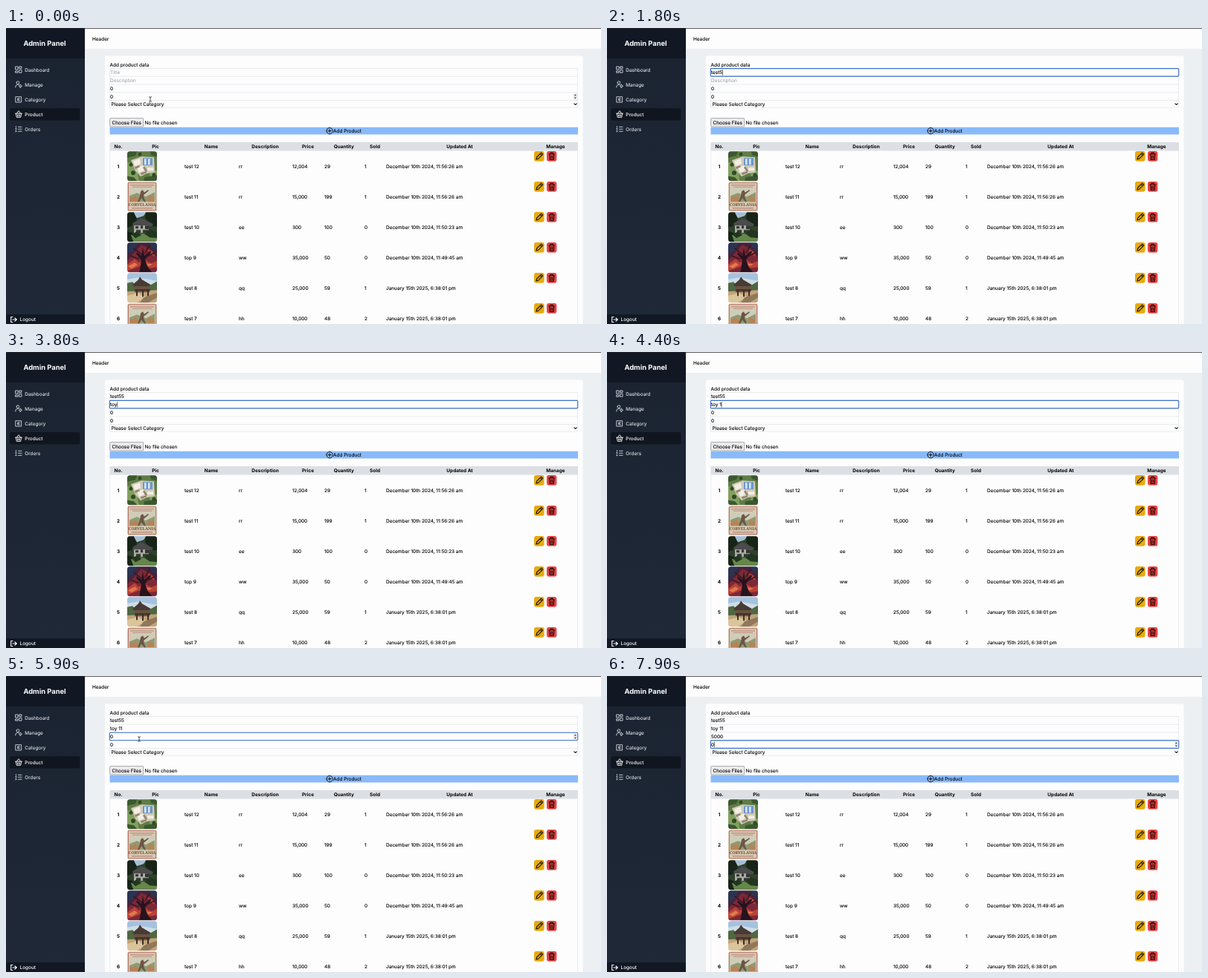
Animation of 800 by 399 pixels, one loop 8000 ms. Source, as an HTML page:

```html
<!DOCTYPE html>
<html lang="en">
<head>
<meta charset="utf-8">
<title>Admin Panel</title>
<style>
  html, body { margin: 0; width: 100%; height: 100%; overflow: hidden; background: #edf0f3; }
  svg { display: block; width: 800px; height: 399px; }
  text { font: 6.45px Inter, "Open Sans", sans-serif; fill: #000; stroke: #000; stroke-width: .12; text-rendering: geometricPrecision; white-space: pre; }
  .bold { font-weight: 700; stroke: none; }
  .mid { text-anchor: middle; }
  .nav { fill: #d9dde3; stroke: #d9dde3; }
  .on { fill: #fff; stroke: none; font-weight: 500; }
  .hint { fill: #9297a0; stroke: none; }
  .opt { font-size: 5.5px; font-weight: 600; fill: #f4f4f5; stroke: none; }
  .line { fill: none; stroke-linecap: round; stroke-linejoin: round; }
  .photo { clip-path: url(#frame); filter: blur(.45px); }
</style>
</head>
<body>
<svg id="stage" viewBox="0 0 800 399">
  <defs>
    <linearGradient id="side" x2="0" y2="1">
      <stop offset="0" stop-color="#1b2331"/><stop offset="1" stop-color="#1f2937"/>
    </linearGradient>
    <clipPath id="frame"><rect width="40" height="40" rx="3.5"/></clipPath>

    <g id="villa" class="photo">
      <path fill="#5f7d45" d="M-2-2h44v44h-44z"/>
      <path fill="#83a05e" d="M-2 14l14 4 4 24H-2zM30 28l12-3v10l-11 1z"/>
      <path fill="#3b5830" d="M-2-2h16l-3 8-13 3zM30-2h12v10l-10-3zM-2 33l11 2 6 7H-2zM23 35l19-3v10H22z"/>
      <path fill="#d2cab8" d="M5 12l14-5 17 1 1 20-11 2-8 4-7-8z"/>
      <path fill="#f2eee4" d="M8 13l9-3 1 7-8 3zM13 21l9-2 3 6-9 4zM27 22h8v4h-8z"/>
      <path fill="#93866f" d="M18 12l2 9M10 21l6-2 1 2-6 3zM23 20l4 6-2 2-4-6zM18 29l8-2v2l-7 3z"/>
      <path fill="#6d98cd" d="M21 9h13v10H21z"/>
      <path fill="#dce8f3" d="M23 10h2.5v8H23zM28 10h2.5v8H28z"/>
      <g fill="#2f4b29"><circle cx="5" cy="18" r="2.5"/><circle cx="8" cy="29" r="3"/><circle cx="36" cy="32" r="2.6"/><circle cx="17" cy="4" r="2.4"/></g>
    </g>

    <g id="poster" clip-path="url(#frame)">
      <path fill="#d8c9b3" d="M0 0h40v40H0z"/>
      <path fill="none" stroke="#b9796a" d="M1.5 1.5h37v37h-37z"/>
      <path fill="#bd9080" d="M4 4h32v1.4H4zM7 6.6h26v1H7z"/>
      <path fill="#cdcdb8" d="M3 9h34v18H3z"/>
      <path fill="#8f9a75" d="M3 19l10-4 12 5 12-6v13H3z"/>
      <path fill="#b78354" d="M3 23l8-4 7 8H3zM28 19l7 2 2 6h-9z"/>
      <path fill="#6d5544" d="M18 13l3-2 2 4-1 5 3 7h-2l-4-5-3 5h-2l3-8zM22 15l6-4 1 1-6 5z"/>
      <text class="mid" x="20" y="32.6" style="font:700 5.4px 'Noto Serif',serif;fill:#6f4a36;stroke:none">CORVELANIA</text>
      <path fill="#b58674" d="M6 35h28v1.3H6z"/>
    </g>

    <g id="house" class="photo">
      <path fill="#2f412b" d="M-2-2h44v44h-44z"/>
      <path fill="#a5bfd6" d="M7-2h20l-5 7-9 3z"/>
      <path fill="#182418" d="M-2-2h10l5 12-7 9-8 2zM25-2h17v22l-10-2-8-10zM-2 25l10 3 2 14H-2z"/>
      <path fill="#4b4a4c" d="M7 15l12-7 16 8-2 3H8z"/>
      <path fill="#a9aaa1" d="M9 18h20v10H9z"/>
      <path fill="#303631" d="M11 19h4v3h-4zM18 18h3v4h-3zM24 18h5v5h-5zM12 24h6v4h-6zM21 24h8v4h-8z"/>
      <path fill="#65874a" d="M5 31l16-2 21 3v10H9z"/>
      <path fill="#22361f" d="M23 29l8-6 11 5v7l-12-1zM6 30l7-4 6 5-8 4z"/>
    </g>

    <g id="ember" class="photo">
      <path fill="#44243c" d="M-2-2h44v44h-44z"/>
      <path fill="#2b3450" d="M-2-2h17L8 11-2 17zM29-2h13v12l-9-3z"/>
      <path fill="#7d2837" d="M-2 26L11 12l8-9 12 6 11 13v20H-2z"/>
      <path fill="#bb4138" d="M-2 31l12-9 5 5 10-3 7 4 10-4v9l-16 2-9-3-19 7zM27 9l7 3 3 7-6-4z"/>
      <path fill="#dd7a4b" d="M1 32l9-5 4 3-8 5zM25 28l9 1-5 3z"/>
      <path fill="#27131d" d="M16 42l3-18-7-9 1-2 6 5 2-11 2 11 8-7 1 2-8 10 3 9 8 10z"/>
      <path class="line" stroke="#321923" stroke-width="1.6" d="M19 16L9 8M24 14l6-10M26 19l10-5M15 22L5 18"/>
    </g>

    <g id="hut" class="photo">
      <path fill="#a5c2df" d="M-2-2h44v44h-44z"/>
      <path fill="#cfdde7" d="M-2 9l17-3 27 5v9H-2z"/>
      <path fill="#506743" d="M-2 14l9-2 6 6 17-1 12-7v15H-2z"/>
      <path fill="#c0a377" d="M-2 25l44-2v19H-2z"/>
      <path fill="#dac49a" d="M-2 31l16-4 11 5-15 10H-2z"/>
      <path fill="#92785a" d="M22 33l20-7v6L25 42h-9z"/>
      <path fill="#483a34" d="M7 16l8-7 2-4 3 4 12 7-3 2H9z"/>
      <path fill="#6b5240" d="M10 18h20v8H10z"/>
      <path fill="#3c2f29" d="M10 22h21v2H10zM12 24h2v7h-2zM20 24h2v8h-2zM27 24h2v7h-2z"/>
    </g>

    <g id="edit">
      <rect width="13.6" height="13.8" rx="3" fill="#e7aa0e"/>
      <path class="line" stroke="#1c1606" stroke-width="1.15" d="M3 11l.7-3 6-5.8 2.1 2-6 6zM8.4 3.7l2 2"/>
    </g>
    <g id="bin">
      <rect width="13.4" height="13.8" rx="3" fill="#e94545"/>
      <path class="line" stroke="#2b0808" stroke-width="1.15" d="M2.7 4h8M4.9 4V2.4h3.6V4M3.6 4l.5 7.3h5.2L9.8 4M5.7 6v3.4M7.7 6v3.4"/>
    </g>
    <g id="spin">
      <rect width="5.4" height="8.4" fill="#ececee"/>
      <path fill="#3c3e42" d="M1.2 3.2l1.5-2 1.5 2zM1.2 5.3h3l-1.5 2z"/>
    </g>
  </defs>

  <path fill="#edf0f3" d="M0 0h800v399H0z"/>
  <path fill="#fefdfe" d="M106 0h694v28H106z"/>
  <text x="116" y="16.8">Header</text>

  <path fill="url(#side)" d="M0 0h106v399H0z"/>
  <path fill="#111824" d="M0 0h106v41H0zM0 386h106v13H0z"/>
  <path fill="#29292e" d="M0 0h800v.8H0z"/>
  <text class="bold mid" x="52" y="24.2" style="font-size:9.4px;fill:#fff">Admin Panel</text>
  <rect x="5" y="108" width="94.5" height="16.5" rx="3" fill="#10161f"/>
  <g class="line" stroke="#d3d7de" stroke-width=".9">
    <path d="M13 52h3v4h-3zM18 52h3v2.4h-3zM13 58h3v2.2h-3zM18 56.4h3v3.8h-3z"/>
    <path d="M12.8 80v-1q0-2.5 3-2.5h1M14 73.7a1.9 1.9 0 1 0 3.8 0a1.9 1.9 0 1 0-3.8 0M17.7 78.3a1.5 1.5 0 1 0 3 0a1.5 1.5 0 1 0-3 0M19.2 76v.7M19.2 80v.7M21.5 78.3h-.7"/>
    <path d="M13.2 92.7h7.4v7.4h-7.4zM18.4 94.8h-2.6v3.2h2.6M15.8 96.4h1.8"/>
    <path stroke="#fff" d="M12.6 115.2h8.8M13.3 115.4l1 5h5.4l1-5M14.8 115l1.7-3M19.2 115l-1.7-3M15.6 117v1.8M17 117v1.8M18.4 117v1.8"/>
    <path d="M16.5 133.3h4.6M16.5 136.3h4.6M16.5 139.3h4.6M13.4 132.5v1.7M13 135.7h1v1h-1M13 138.7h1v1h-1"/>
    <path stroke="#fff" stroke-width="1.1" d="M9 389.5H6.7v7H9M9 393h5.2M12 390.8l2.3 2.2-2.3 2.2"/>
  </g>
  <text class="on" x="18.5" y="395.4">Logout</text>

  <path fill="#fefdfe" d="M133 399V40.5q0-3 3-3h636.5q3 0 3 3V399z"/>
  <text x="139.5" y="51.9">Add product data</text>
  <path fill="none" stroke="#dfe2e6" stroke-width=".7" d="M139.5 54.6h629v52.6h-629zM139.5 65.3h629M139.5 76.1h629M139.5 86.9h629M139.5 97.6h629"/>
  <text x="141.5" y="104.9">Please Select Category</text>
  <path class="line" stroke="#222" stroke-width="1.1" d="M763.8 101.8l1.8 1.7 1.8-1.7"/>
  <rect x="139.7" y="121.6" width="45" height="11.4" rx=".8" fill="#ececee" stroke="#77797d" stroke-width=".6"/>
  <text class="mid" x="162.2" y="129.7">Choose Files</text>
  <text x="186.5" y="129.7">No file chosen</text>
  <path fill="#88bafb" d="M139.5 133.7h629.5v9.8H139.5z"/>
  <path class="line" stroke="#111" stroke-width="1" d="M430.9 138.7a4.2 4.2 0 1 0 8.4 0a4.2 4.2 0 1 0-8.4 0M433 138.7h4.2M435.1 136.6v4.2"/>
  <text x="440" y="141.1">Add Product</text>

  <path fill="#dcdfe3" d="M139.5 154h629.5v11.6H139.5z"/>
  <path stroke="#e3e5e9" stroke-width=".8" d="M139.7 165v234M768.6 165v234"/>

  <g id="static"></g>
  <g id="live"></g>
  <path id="beam" class="line" stroke="#222" stroke-width=".8" d="M-1.5-3.2Q0-3.2 0-2.4Q0-3.2 1.5-3.2M0-2.4V2.4M-1.5 3.2Q0 3.2 0 2.4Q0 3.2 1.5 3.2"/>
</svg>

<script>
const LOOP = 8000, STEP = 100;
const $ = id => document.getElementById(id);
const text = (x, y, s, cls = '') => `<text x="${x}" y="${y}" class="${cls}">${s}</text>`;
const use = (id, x, y) => `<use href="#${id}" x="${x}" y="${y}"/>`;

// Navigation, table head and rows
const nav = ['Dashboard', 'Manage', 'Category', 'Product', 'Orders'];
const heads = { 'No.': 151, Pic: 201, Name: 276, Description: 348.5, Price: 406, Quantity: 454.3, Sold: 496, 'Updated At': 610, Manage: 739 };
const cols = [240, 313, 385, 428, 482, 511];
const rows = [
  ['villa', 'test 12', 'rr', '12,004', 29, 1, 'December 10th 2024, 11:56:26 am'],
  ['poster', 'test 11', 'rr', '15,000', 199, 1, 'December 10th 2024, 11:56:26 am'],
  ['house', 'test 10', 'ee', '300', 100, 0, 'December 10th 2024, 11:50:23 am'],
  ['ember', 'top 9', 'ww', '35,000', 50, 0, 'December 10th 2024, 11:49:45 am'],
  ['hut', 'test 8', 'qq', '25,000', 59, 1, 'January 15th 2025, 6:38:01 pm'],
  ['poster', 'test 7', 'hh', '10,000', 48, 2, 'January 15th 2025, 6:38:01 pm']
];
let html = nav.map((s, i) => text(25.3, 58.5 + 20.1 * i, s, i === 3 ? 'on' : 'nav')).join('');
for (const s in heads) html += text(heads[s], 162.2, s, 'bold mid');
rows.forEach(([pic, ...cells], i) => {
  const y = 41 * i;
  html += text(151, y + 188.5, i + 1, 'bold mid') + use(pic, 163, y + 166.2);
  cells.forEach((s, c) => html += text(cols[c], y + 188.5, s));
  html += use('edit', 710, y + 166) + use('bin', 727, y + 166);
});
$('static').innerHTML = html;

// Form fields: each key press time adds one more character of the value
const fields = [
  { y: 54.5, hint: 'Title', value: 'test55', keys: [1000, 1200, 1300, 1500, 1700, 2000], from: 900 },
  { y: 65.3, hint: 'Description', value: 'toy 11', keys: [3400, 3600, 3800, 4100, 4300, 4700], from: 2700,
    options: ['toy', 'test', 'dest', 'des', 'rr', 'asdf'] },
  { y: 76.1, start: '0', value: '5000', keys: [6400, 6800, 7000, 7200], from: 5400, options: ['54', '543'] },
  { y: 86.8, start: '0', value: '', keys: [], from: 7500 }
];

// Pointer stops [time, x, y] and the spans in which it is seen
const path = [[0, 194, 96], [200, 194, 96], [700, 171, 61], [2200, 171, 61], [2600, 169, 74], [4900, 169, 74], [5200, 179, 85]];
const shown = [[0, 1000], [2200, 3400], [4900, 6400]];

function pointer(t) {
  const i = path.findIndex(p => p[0] > t);
  if (i < 0) return path.at(-1).slice(1);
  const [t0, x0, y0] = path[i - 1], [t1, x1, y1] = path[i];
  const k = (t - t0) / (t1 - t0), e = k * k * (3 - 2 * k);
  return [x0 + (x1 - x0) * e, y0 + (y1 - y0) * e];
}

function popup(list, y) {
  const h = 15 * list.length + 3.4;
  return `<path fill="#141317" d="M185 ${y}l3.6-3.8 3.6 3.8z"/>
    <rect x="180.8" y="${y}" width="65.2" height="${h}" rx="3" fill="#141317"/>` +
    list.map((s, i) => text(185.8, y + 11.5 + 15 * i, s, 'opt')).join('');
}

function draw(t) {
  const [px, py] = pointer(t);
  const seen = shown.some(([a, b]) => t >= a && t < b);
  const focus = fields.findLastIndex(f => t >= f.from);
  let out = '', top = '';
  fields.forEach((f, i) => {
    const n = f.keys.filter(k => k <= t).length;
    const value = n ? f.value.slice(0, n) : f.start || '';
    const on = i === focus, over = seen && py >= f.y && py < f.y + 10.7;
    if (on) out += `<rect x="139.3" y="${f.y + .1}" width="629.4" height="10.5" rx="1.2" fill="#fefdfe" stroke="#3a6fc8" stroke-width="1.15"/>`;
    out += `<text id="v${i}" x="140" y="${f.y + 7.8}" class="${value ? '' : 'hint'}">${value || f.hint}</text>`;
    if (f.start && (on || over)) out += use('spin', 762.7, f.y + 1.3);
    if (on && f.options) {
      const typed = n ? value : f.start || '';
      const list = f.options.filter(s => s.startsWith(typed) && s !== typed);
      if (list.length && t >= f.from + 100) top = popup(list, f.y + 14.9);
    }
  });
  $('live').innerHTML = out + top;

  const f = fields[focus];
  if (f) {
    const last = Math.max(f.from, ...f.keys.filter(k => k <= t));
    if (Math.floor((t - last) / 500) % 2 === 0) {
      const field = $('v' + focus);
      const x = 140.3 + (field.classList.contains('hint') ? 0 : field.getComputedTextLength());
      $('live').insertAdjacentHTML('beforeend', `<path stroke="#111" stroke-width=".6" d="M${x} ${f.y + 1.7}v7.6"/>`);
    }
  }
  $('beam').setAttribute('transform', `translate(${px} ${py})`);
  $('beam').style.display = seen ? '' : 'none';
}

let shownAt = -1;
function tick() {
  const t = Math.floor(performance.now() % LOOP / STEP) * STEP;
  if (t !== shownAt) draw(shownAt = t);
  requestAnimationFrame(tick);
}
tick();
</script>
</body>
</html>
```
